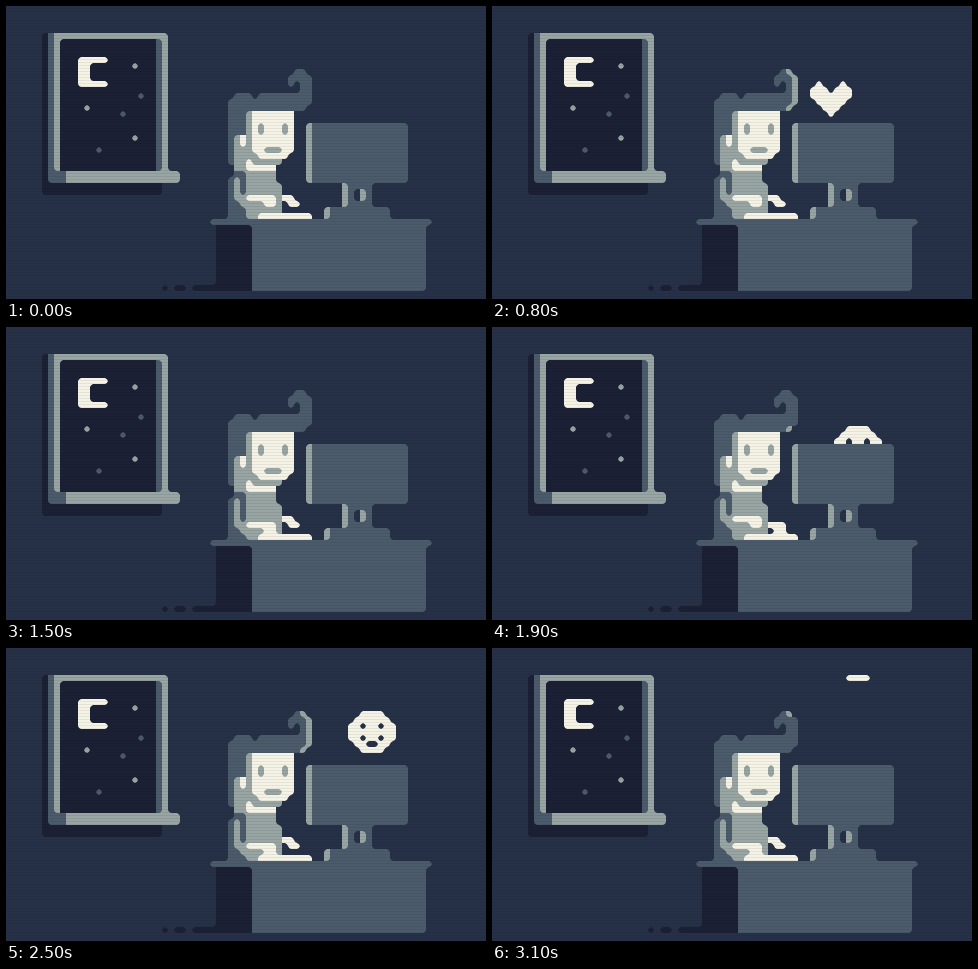
Animation of 480x293 px, one loop 3.2 s. Source, as an HTML page with a canvas:

```html
<!DOCTYPE html>
<html lang="en">
<head>
<meta charset="utf-8">
<title>Night desk</title>
<style>
html, body { margin: 0; width: 100%; height: 100%; overflow: hidden; background: #263147; }
canvas { display: block; width: 100vw; height: 100vh; }
</style>
</head>
<body>
<canvas id="stage" width="480" height="293"></canvas>
<script>
const ctx = document.getElementById('stage').getContext('2d');
const COLS = 80, ROWS = 49, CELL = 6, TOP = 3;
const STEP = 100, STEPS = 32;
// Ordered from dark to bright; the brighter colour wins diagonal joins.
const COLORS = ['#1b2035', '#263147', '#4b5b6b', '#98a5a3', '#f5f3e6'];
const DARK = 0, NIGHT = 1, MID = 2, LIGHT = 3, CREAM = 4;

const HEART = [
  '.#...#.',
  '###.###',
  '#######',
  '.#####.',
  '..###..',
  '...#...'
];
const SMILEY = [
  '..####..',
  '.######.',
  '##.##.##',
  '########',
  '##.##.##',
  '.##..##.',
  '..####..'
];

const grid = new Uint8Array(COLS * ROWS);

function box(color, x, y, w = 1, h = 1) {
  for (let r = y; r < y + h; r++) grid.fill(color, r * COLS + x, r * COLS + x + w);
}

function at(x, y) {
  return x < 0 || y < 0 || x >= COLS || y >= ROWS ? NIGHT : grid[y * COLS + x];
}

function drawWindow(n) {
  box(DARK, 6, 4, 20, 27);
  box(MID, 7, 4, 19, 25);
  box(LIGHT, 8, 4, 19, 23);
  box(DARK, 9, 5, 16, 22);
  box(MID, 25, 5, 1, 22);
  box(LIGHT, 10, 27, 19, 2);

  // moon
  box(CREAM, 12, 8, 5, 5);
  box(DARK, 14, 9, 3, 3);

  // stars
  box(LIGHT, 21, 9);
  box(LIGHT, 13, 16);
  box(LIGHT, 21, 21);
  box(MID, 22, 14);
  box(MID, 19, 17);
  box(MID, 15, 23);
  if (n === 11) box(MID, 17, 12);
  if (n === 13) box(MID, 16, 13);
}

function drawDesk() {
  box(MID, 34, 35, 37);
  box(DARK, 35, 36, 6, 11);
  box(MID, 41, 36, 29, 11);
  box(DARK, 31, 46, 4);
  box(DARK, 28, 46, 2);
  box(DARK, 26, 46);
}

function drawMonitor() {
  box(LIGHT, 50, 19, 1, 10);
  box(MID, 51, 19, 16, 10);
  box(LIGHT, 56, 29, 1, 4);
  box(MID, 57, 29, 4, 4);
  box(NIGHT, 58, 30, 1, 2);
  box(LIGHT, 59, 30, 1, 2);
  box(LIGHT, 53, 33, 1, 2);
  box(MID, 54, 33, 10, 2);
}

function drawHair() {
  box(MID, 48, 10, 2);
  box(MID, 47, 11, 4);
  box(MID, 47, 12);
  box(MID, 49, 12, 2, 2);
  box(MID, 38, 14, 3);
  box(MID, 42, 14, 9);
  box(MID, 37, 15, 14);
  box(MID, 37, 16, 13);
  box(MID, 37, 17, 3, 9);
}

function drawHead(blink) {
  box(LIGHT, 40, 17, 1, 8);
  box(LIGHT, 41, 24);
  box(CREAM, 41, 17, 7, 7);
  box(CREAM, 42, 24, 5);
  box(LIGHT, 43, 23, 3);
  if (!blink) {
    box(LIGHT, 42, 19, 1, 2);
    box(LIGHT, 46, 19, 1, 2);
  }
  box(LIGHT, 38, 21, 2, 6);
  box(CREAM, 39, 21, 1, 2);
  box(LIGHT, 41, 25, 5);
  box(CREAM, 40, 25);
  box(CREAM, 40, 26, 5);
}

function drawBody(leftDown, rightDown) {
  box(MID, 38, 27, 2);
  box(MID, 37, 28, 3, 7);
  box(LIGHT, 40, 27, 5, 2);
  box(LIGHT, 40, 29, 6, 6);

  const arm = leftDown ? 1 : 0;
  box(LIGHT, 38, 28, 1, 4 + arm);
  box(LIGHT, 39, 31 + arm, 1, 2);
  box(CREAM, 40, 31 + arm, 5);
  box(CREAM, 43, 32 + arm, 2);

  if (rightDown) {
    box(CREAM, 46, 32, 3);
    box(CREAM, 47, 33, 2);
  } else {
    box(CREAM, 46, 31, 2);
    box(CREAM, 47, 32, 2);
  }
  box(CREAM, 42, 34, 9);
}

// The icon climbs one row per step, appearing and vanishing row by row.
function drawIcon(rows, x, n, start, end) {
  const top = 18 - (n - start);
  const count = Math.min(rows.length, n - start + 1, end - n);
  for (let r = 0; r < count; r++) {
    [...rows[r]].forEach((c, i) => { if (c === '#') box(CREAM, x + i, top + r); });
  }
}

// Reflection running up the outer edge of the curl.
function drawGlow(first, last) {
  for (let i = Math.max(0, first); i <= Math.min(6, last); i++) {
    box(LIGHT, i === 0 || i === 6 ? 49 : 50, 16 - i);
  }
}

function buildScene(n) {
  const beat = n % 8;
  grid.fill(NIGHT);
  drawWindow(n);
  drawDesk();
  drawMonitor();
  drawHair();
  drawHead(n === 27);
  drawBody(beat === 1 || beat === 7, beat === 3 || beat === 5);
  if (n < 16) {
    drawIcon(HEART, 53, n, 2, 15);
    drawGlow(n - 8, n - 2);
  } else {
    drawIcon(SMILEY, 57, n, 17, 32);
    drawGlow(n - 25, n - 19);
  }
}

function roundCorner(x, y, dx, dy) {
  const own = at(x, y), side = at(x + dx, y), far = at(x + dx, y + dy);
  if (side === own || side !== at(x, y + dy)) return;
  if (far === own && own > side) return;
  const vx = (x + (dx > 0)) * CELL, vy = TOP + (y + (dy > 0)) * CELL;
  ctx.fillStyle = COLORS[side];
  ctx.beginPath();
  ctx.moveTo(vx, vy);
  ctx.lineTo(vx - dx * 3, vy);
  ctx.quadraticCurveTo(vx - dx * 0.75, vy - dy * 0.75, vx, vy - dy * 3);
  ctx.fill();
}

function paint() {
  ctx.fillStyle = COLORS[NIGHT];
  ctx.fillRect(0, 0, 480, 293);
  for (let y = 0; y < ROWS; y++) {
    for (let x = 0; x < COLS; x++) {
      ctx.fillStyle = COLORS[at(x, y)];
      ctx.fillRect(x * CELL, TOP + y * CELL, CELL, CELL);
    }
  }
  for (let y = 0; y < ROWS; y++) {
    for (let x = 0; x < COLS; x++) {
      for (const dx of [-1, 1]) for (const dy of [-1, 1]) roundCorner(x, y, dx, dy);
    }
  }
  // scanlines
  ctx.fillStyle = 'rgba(0, 0, 0, 0.07)';
  for (let y = 2; y < 293; y += 3) ctx.fillRect(0, y, 480, 1);
}

let shown = -1;
const begin = performance.now();

function tick() {
  const n = Math.floor((performance.now() - begin) / STEP) % STEPS;
  if (n !== shown) {
    shown = n;
    buildScene(n);
    paint();
  }
  requestAnimationFrame(tick);
}
tick();
</script>
</body>
</html>
```
